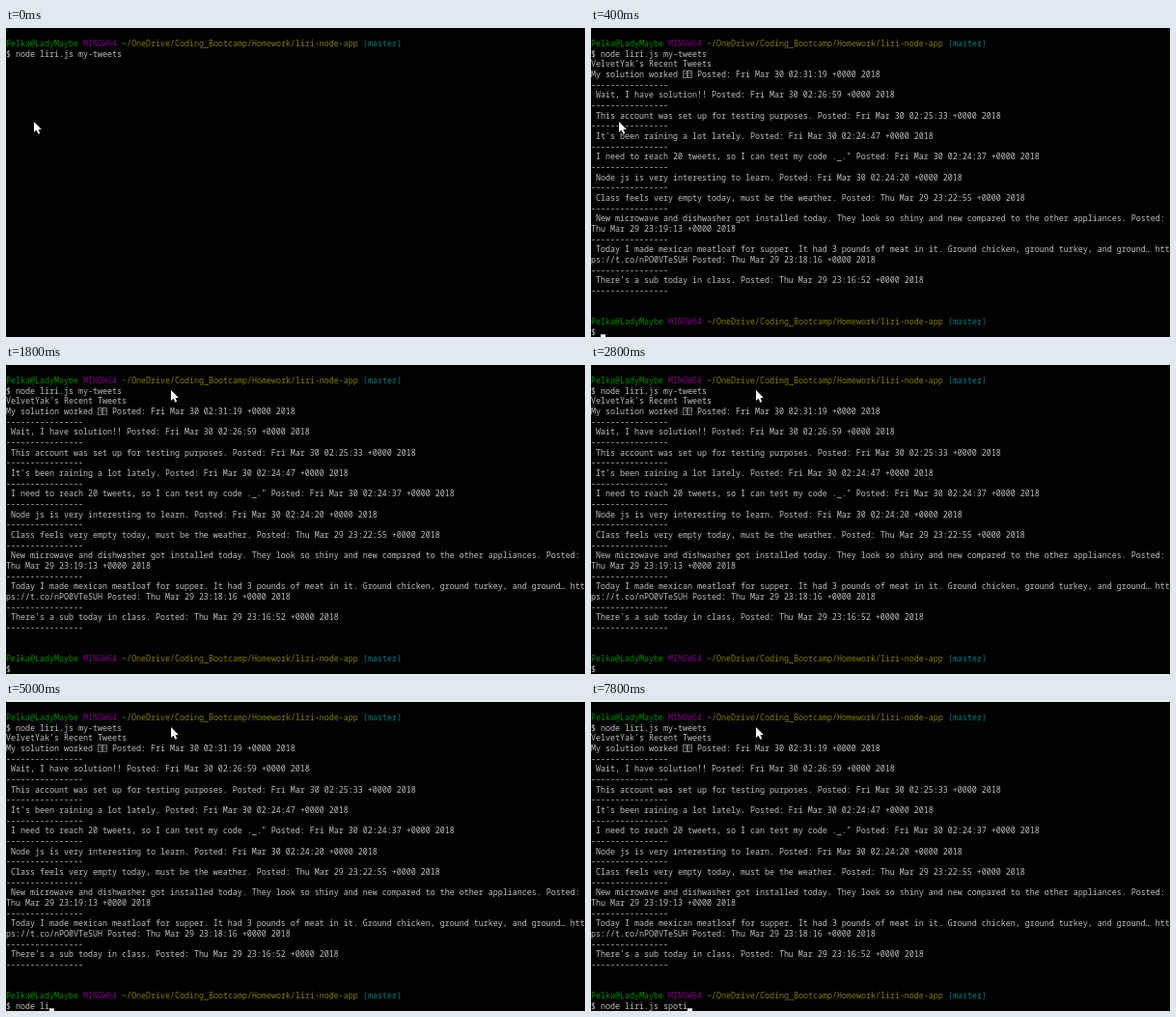
Recreate the animation shown at these times as an HTML page with a canvas. Size 600x320 px, loop 8 s.

```html
<!DOCTYPE html>
<html lang="en">
<head>
<meta charset="utf-8">
<title>Terminal</title>
<style>
  html, body { margin: 0; width: 100%; height: 100%; overflow: hidden; background: #000; }
  canvas { display: block; }
</style>
</head>
<body>
<canvas id="stage" width="600" height="320"></canvas>
<script>
const ctx = document.getElementById('stage').getContext('2d');
const LOOP = 8000, STEP = 200;
const CELL_W = 5, CELL_H = 320 / 30;
const GREY = '#c0c0c0';
const FONT = '"Noto Sans Mono", "DejaVu Sans Mono", monospace';

const PROMPT = [
  ['Pelka@LadyMaybe ', '#008c00'],
  ['MINGW64 ', '#800080'],
  ['~/OneDrive/Coding_Bootcamp/Homework/liri-node-app ', '#808000'],
  ['(master)', '#008080'],
];

const TWEETS = [
  ['My solution worked   ', 'Fri Mar 30 02:31:19'],
  ['Wait, I have solution!!', 'Fri Mar 30 02:26:59'],
  ['This account was set up for testing purposes.', 'Fri Mar 30 02:25:33'],
  ["It's been raining a lot lately.", 'Fri Mar 30 02:24:47'],
  ['I need to reach 20 tweets, so I can test my code ._."', 'Fri Mar 30 02:24:37'],
  ['Node js is very interesting to learn.', 'Fri Mar 30 02:24:20'],
  ['Class feels very empty today, must be the weather.', 'Thu Mar 29 23:22:55'],
  ['New microwave and dishwasher got installed today. They look so shiny and new compared to the other appliances.', 'Thu Mar 29 23:19:13'],
  ['Today I made mexican meatloaf for supper. It had 3 pounds of meat in it. Ground chicken, ground turkey, and ground… https://t.co/nPO0VTeSUH', 'Thu Mar 29 23:18:16'],
  ["There's a sub today in class.", 'Thu Mar 29 23:16:52'],
];

// Each tweet wraps at the window width and is followed by a rule.
const output = TWEETS.flatMap(([text, date], i) => {
  const line = `${i ? ' ' : ''}${text} Posted: ${date} +0000 2018`;
  return [...line.match(/.{1,120}/g), '-'.repeat(16)];
});
const LAST_ROW = 28;

// Keyframes hold their value until the next one: [time, value].
const TYPED = [
  [0, ''], [3600, 'n'], [3800, 'no'], [4000, 'nod'], [4200, 'node'], [4400, 'node '],
  [4800, 'node l'], [5000, 'node li'], [5200, 'node lir'], [5400, 'node liri'],
  [5600, 'node liri.j'], [5800, 'node liri.js'], [6000, 'node liri.js '],
  [6600, 'node liri.js s'], [7000, 'node liri.js sp'], [7200, 'node liri.js spo'],
  [7600, 'node liri.js spot'], [7800, 'node liri.js spoti'],
];
const CURSOR = [
  [0, false], [200, true], [1000, false], [1400, true], [1800, false],
  [2200, true], [2800, false], [3400, true], [6000, false], [6600, true],
];
const MOUSE = [
  [0, [29, 97]], [800, [110, 76]], [1000, [270, 40]], [1200, [400, 16]],
  [1400, [421, 13]], [1800, [171, 26]],
];
const at = (keys, t) => keys.findLast(([time]) => time <= t)[1];

function print(text, row, col = 0, color = GREY) {
  ctx.fillStyle = color;
  ctx.fillText(text, col * CELL_W, Math.round((row + 1) * CELL_H + 8.3));
}

function drawPrompt(row, command) {
  let col = 0;
  for (const [text, color] of PROMPT) {
    print(text, row, col, color);
    col += text.length;
  }
  print('$ ' + command, row + 1);
}

function drawMissingGlyph(row, col) {
  const x = col * CELL_W, y = Math.round((row + 1) * CELL_H) + 1;
  ctx.strokeStyle = '#909090';
  ctx.lineWidth = 0.8;
  ctx.strokeRect(x + 0.5, y + 0.5, 4, 7);
  ctx.save();
  ctx.font = `5px ${FONT}`;
  ctx.fillStyle = GREY;
  ctx.fillText('?', x + 1, y + 6);
  ctx.restore();
}

function drawCursor(row, col) {
  ctx.fillStyle = '#fff';
  ctx.fillRect(col * CELL_W, (row + 2) * CELL_H - 2.7, CELL_W, 2.7);
}

const arrow = new Path2D('M0 0V11L2.6 8.7L4.4 12.8L6.2 12L4.5 8.1H7.8Z');

function drawMouse([x, y]) {
  ctx.save();
  ctx.translate(x, y);
  ctx.strokeStyle = '#000';
  ctx.lineWidth = 1;
  ctx.stroke(arrow);
  ctx.fillStyle = '#fff';
  ctx.fill(arrow);
  ctx.restore();
}

function draw(now) {
  const t = Math.floor((now % LOOP) / STEP) * STEP;
  const done = t >= 400, typed = at(TYPED, t);

  ctx.fillStyle = '#000';
  ctx.fillRect(0, 0, 600, 320);
  ctx.font = `${CELL_W / 0.6}px ${FONT}`;

  drawPrompt(0, 'node liri.js my-tweets');
  if (t >= 200) print("VelvetYak's Recent Tweets", 2);
  if (done) {
    output.forEach((line, i) => print(line, 3 + i));
    drawMissingGlyph(3, 19);
    drawMissingGlyph(3, 20);
    drawPrompt(LAST_ROW - 1, typed);
  }
  if (at(CURSOR, t)) drawCursor(done ? LAST_ROW : 3, done ? 2 + typed.length : 0);
  drawMouse(at(MOUSE, t));
  requestAnimationFrame(draw);
}
requestAnimationFrame(draw);
</script>
</body>
</html>
```
